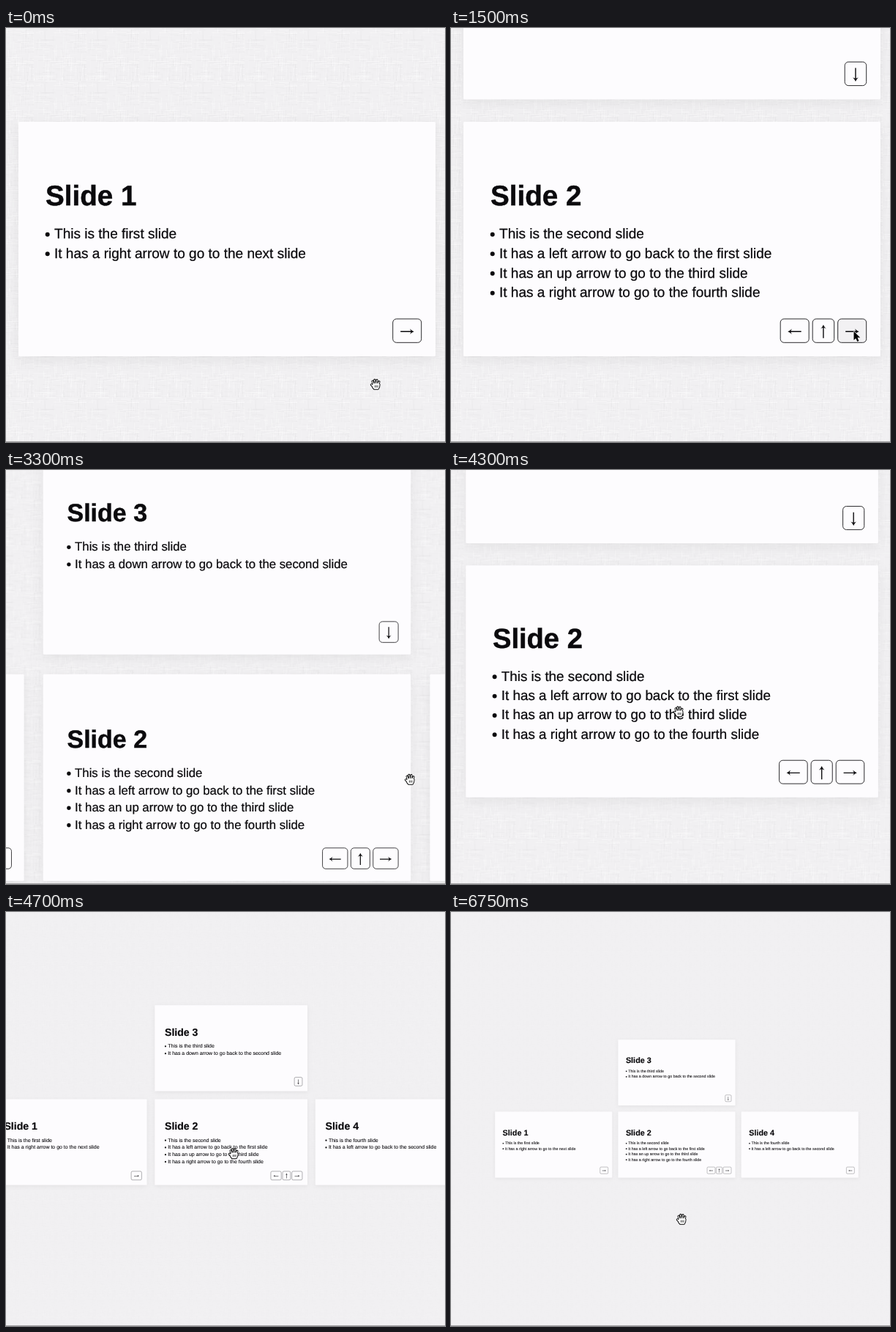
Recreate the animation shown at these times as an HTML page. Size 600 by 565 pixels, loop 7200 ms.

```html
<!DOCTYPE html>
<html lang="en">
<head>
<meta charset="utf-8">
<title>Slides on a canvas</title>
<style>
  html, body { margin: 0; width: 100%; height: 100%; overflow: hidden; background: #f1f0f2; }
  svg { display: block; width: 100%; height: 100%; }
  text { font-family: "Liberation Sans", Helvetica, Arial, sans-serif; font-size: 19.05px; fill: #0b0a0d;
    stroke: #0b0a0d; stroke-width: .25px; text-rendering: geometricPrecision; }
  .title { font-size: 38.6px; font-weight: bold; stroke-width: .5px; }
</style>
</head>
<body>
<svg id="stage" viewBox="0 0 600 565">
  <defs>
    <pattern id="linen" width="72" height="72" patternUnits="userSpaceOnUse"></pattern>
    <filter id="shadow" x="-10%" y="-15%" width="120%" height="135%">
      <feDropShadow dx="0" dy="5" stdDeviation="9" flood-color="#000" flood-opacity=".06"/>
    </filter>
  </defs>
  <rect width="600" height="565" fill="#f1f0f2"/>
  <rect id="paper" width="600" height="565" fill="url(#linen)"/>
  <g id="world"></g>
  <rect y="564" width="600" height="1" fill="#a3a2a4"/>
  <g id="hand" stroke-linecap="round" stroke-linejoin="round"></g>
  <path id="arrow" d="M0 0V12L2.8 9.4 4.8 14 7 13 5 8.6H8.8Z" fill="#000" stroke="#fff" stroke-width="1" paint-order="stroke"/>
</svg>
<script>
const LOOP = 7200, CX = 302, CY = 288, W = 570, H = 320, ROW = 350.7, COL = 600;
const $ = id => document.getElementById(id);

function add(parent, tag, attrs, text) {
  const el = document.createElementNS("http://www.w3.org/2000/svg", tag);
  for (const k in attrs) el.setAttribute(k, attrs[k]);
  if (text) el.textContent = text;
  return parent.appendChild(el);
}

const clamp = x => Math.min(1, Math.max(0, x));
const smooth = x => x * x * (3 - 2 * x);
const smoother = x => x * x * x * (x * (6 * x - 15) + 10);
const part = (t, a, b) => clamp((t - a) / (b - a));
const mix = (a, b, p) => a + (b - a) * p;

// Slides, placed by the centre of each card
const slides = [
  { x: -COL, y: 0, keys: "→", lines: ["This is the first slide",
    "It has a right arrow to go to the next slide"] },
  { x: 0, y: 0, keys: "←↑→", lines: ["This is the second slide",
    "It has a left arrow to go back to the first slide",
    "It has an up arrow to go to the third slide",
    "It has a right arrow to go to the fourth slide"] },
  { x: 0, y: -ROW, keys: "↓", lines: ["This is the third slide",
    "It has a down arrow to go back to the second slide"] },
  { x: COL, y: 0, keys: "←", lines: ["This is the fourth slide",
    "It has a left arrow to go back to the second slide"] }
];
const angles = { "→": 0, "↓": 90, "←": 180, "↑": 270 };
const buttons = [];

slides.forEach((slide, i) => {
  const g = add($("world"), "g", { transform: `translate(${slide.x} ${slide.y})` });
  add(g, "rect", { x: -W / 2, y: -H / 2, width: W, height: H, rx: 1.5, fill: "#fdfcfe", filter: "url(#shadow)" });
  add(g, "text", { x: -248, y: -45.8, class: "title" }, "Slide " + (i + 1));
  slide.lines.forEach((line, n) => {
    const y = -0.8 + n * 26.67;
    add(g, "circle", { cx: -245.3, cy: y - 5.5, r: 3, fill: "#0b0a0d" });
    add(g, "text", { x: -236, y }, line);
  });
  let right = 265.7;
  for (const key of [...slide.keys].reverse()) {
    const w = "↑↓".includes(key) ? 29.5 : 39, x = right - w, y = 109;
    const box = add(g, "rect", { x, y, width: w, height: 32.3, rx: 5, fill: "#fdfcfe", stroke: "#2b2a2d" });
    add(g, "path", { d: "M-9 -.7H5.2Q4.8 -2 3.8 -3.8 6.4 -1.2 9.4 0 6.4 1.2 3.8 3.8 4.8 2 5.2 .7H-9Z", fill: "#0b0a0d",
      transform: `translate(${x + w / 2} 126.3) rotate(${angles[key]})` });
    buttons.push({ box, x: slide.x + x, y: slide.y + y, w, h: 32.3 });
    right = x - 5;
  }
});

// Woven paper: short faint threads from a small seeded generator
let seed = 7;
const rand = () => (seed = seed * 16807 % 2147483647) / 2147483647;
for (let i = 0; i < 320; i++) {
  const light = rand() < .5, across = rand() < .6, length = 5 + 14 * rand();
  add($("linen"), "rect", {
    x: Math.floor(rand() * 72), y: Math.floor(rand() * 72),
    width: across ? length : 1, height: across ? 1 : length,
    fill: light ? "#fff" : "#000", opacity: rand() * (light ? .4 : .018)
  });
}

// Open hand, centred on the pointer position
const palm = "M-3.6 1.5L-3.2 4.2 -1.6 6.2H3.4L4.6 3.6 5 .6 3 -1.2 -1 -1.4Z";
const fingers = "M-2.6 1L-3.9 -3.8M-.6 -.5L-1.2 -5.6M1.7 -.5L2 -5.4M3.8 .8L4.9 -3.2M-2.8 3.6L-5.6 .8";
add($("hand"), "path", { d: palm + fingers, fill: "#000", stroke: "#000", "stroke-width": 3.1 });
add($("hand"), "path", { d: palm + fingers, fill: "#fff", stroke: "#fff", "stroke-width": 1.3 });
add($("hand"), "path", { d: "M-1.6 -1V-3M.6 -1V-3.4M2.9 -1L3.2 -2.6M-.6 2V4.2M1.2 2V4.2M3 2V4.2",
  stroke: "#000", "stroke-width": .7 });

const moves = [
  // start, end, x, y
  [70, 600, 552, 414],
  [1470, 1750, 508, 414],
  [2490, 2800, 552, 422],
  [3330, 3620, 374, 349],
  [3720, 3950, 311, 329.5],
  [4920, 5400, 315, 419]
];

function pointer(t) {
  let x = 505, y = 486;
  for (const [a, b, nx, ny] of moves) {
    const p = smooth(part(t, a, b));
    x = mix(x, nx, p);
    y = mix(y, ny, p);
  }
  return { x, y };
}

const trips = [[920, 0, 1], [1970, 1, 2], [3120, 2, 1]];

// Fly between slides, pulling back a little on the way
function camera(t) {
  let x = slides[0].x, y = slides[0].y, s = 1;
  for (const [start, from, to] of trips) {
    if (t < start) break;
    const a = slides[from], b = slides[to];
    const k = Math.asinh(Math.hypot(b.x - a.x, b.y - a.y) / 646);
    const v = k * (2 * smooth(part(t, start, start + 332)) - 1);
    const p = .5 + Math.tanh(v) / (2 * Math.tanh(k));
    x = mix(a.x, b.x, p);
    y = mix(a.y, b.y, p);
    s = Math.cosh(v) / Math.cosh(k);
  }
  let tx = CX - x * s, ty = CY - y * s;
  // Wheel zoom around the pointer
  const z = Math.exp(-1.271 * smoother(Math.pow(part(t, 4190, 4900), 1.23)));
  tx = mix(311, tx, z);
  ty = mix(329, ty, z);
  return { tx, ty, s: s * z };
}

function draw(t) {
  const { tx, ty, s } = camera(t), p = pointer(t);
  const view = `translate(${tx} ${ty}) scale(${s})`;
  $("world").setAttribute("transform", view);
  $("linen").setAttribute("patternTransform", view);
  $("paper").setAttribute("opacity", mix(.3, 1, clamp((s - .28) / .6)));

  const wx = (p.x - tx) / s, wy = (p.y - ty) / s;
  let over = false;
  for (const b of buttons) {
    const hit = wx > b.x && wx < b.x + b.w && wy > b.y && wy < b.y + b.h;
    const down = t >= 800 && t < 920;
    b.box.setAttribute("fill", !hit ? "#fdfcfe" : down ? "#ebeaec" : "#f2f1f3");
    over = over || hit;
  }
  const at = `translate(${p.x} ${p.y})`;
  $("hand").setAttribute("transform", at);
  $("arrow").setAttribute("transform", at);
  $("hand").setAttribute("visibility", over ? "hidden" : "visible");
  $("arrow").setAttribute("visibility", over ? "visible" : "hidden");
}

const begin = performance.now();
function tick() {
  draw((performance.now() - begin) % LOOP);
  requestAnimationFrame(tick);
}
tick();
</script>
</body>
</html>
```
